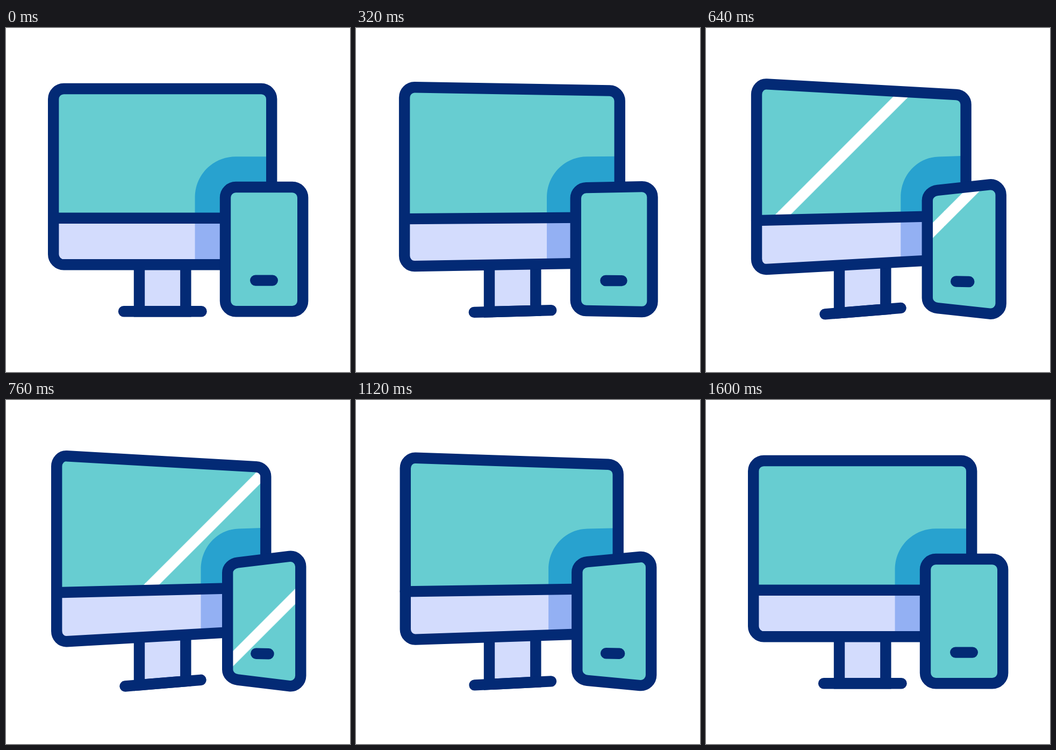
An HTML page for the animation above (1.76 s loop, 640 by 640 pixels).

```html
<!DOCTYPE html>
<html lang="en">
<head>
<meta charset="utf-8">
<title>Monitor and phone</title>
<style>
  html, body { margin: 0; width: 100%; height: 100%; overflow: hidden; background: #fff; }
  svg { display: block; width: 100%; height: 100%; }

  /* Each shape has a front pose (--a) and a turned pose (--b). */
  .monitor path, .phone path, clipPath path {
    d: var(--a);
    animation: turn-monitor 1760ms cubic-bezier(.333, 0, .667, 1) infinite;
  }
  .phone path, clipPath .case { animation-name: turn-phone; }

  @keyframes turn-monitor {
    0%, 5.4%, 82.95%, 100% { d: var(--a); }
    39.5%, 48.9% { d: var(--b); }
  }
  @keyframes turn-phone {
    0%, 9.1%, 87.5%, 100% { d: var(--a); }
    43.2%, 53.4% { d: var(--b); }
  }

  .line { stroke: #032a75; stroke-width: 20.4; stroke-linecap: round; fill: none; }
  .teal { fill: #67cdd1; }
  .pale { fill: #d3dcfd; }

  .glint { stroke: #fff; stroke-width: 20; animation: sweep-monitor 1760ms linear infinite; }
  .phone .glint { animation-name: sweep-phone; }
  @keyframes sweep-monitor {
    0%, 20.45% { transform: translateX(200px); }
    54.55%, 100% { transform: translateX(820px); }
  }
  @keyframes sweep-phone {
    0%, 30.7% { transform: translateX(710px); }
    54.55%, 100% { transform: translateX(1078px); }
  }

  .stand {
    --a: path("M248 440 L248 527.2 L334.3 527.2 L334.3 440");
    --b: path("M248 440 L248 530.3 L334.3 523.2 L334.3 440");
  }
  .base {
    --a: path("M219 527.2 L363.5 527.2");
    --b: path("M221.5 532.5 L362.5 520.8");
  }
  .body {
    --a: path("M88.2 132.3 C88.2 121.7 96.8 113 107.5 113 L475 113 C485.6 113 494.2 121.7 494.2 132.3 L494.2 421 C494.2 431.6 485.6 440.3 475 440.3 L107.5 440.3 C96.8 440.3 88.2 431.6 88.2 421 Z");
    --b: path("M94.2 123.5 C94.2 112.5 102.5 103.6 113 104.2 L465.5 124.2 C475.5 124.8 483.3 132.5 483.3 142.5 L483.3 411 C483.3 421 475.5 428.8 465.5 429.4 L113 449.2 C102.5 449.8 94.2 441 94.2 430 Z");
  }
  .screen {
    --a: path("M88.2 353.7 L88.2 132.3 C88.2 121.7 96.8 113 107.5 113 L475 113 C485.6 113 494.2 121.7 494.2 132.3 L494.2 353.7 Z");
    --b: path("M94.2 358.2 L94.2 123.5 C94.2 112.5 102.5 103.6 113 104.2 L465.5 124.2 C475.5 124.8 483.3 132.5 483.3 142.5 L483.3 348.8 Z");
  }
  .shade {
    --a: path("M351.5 353.7 L351.5 315 C351.5 273 385.5 239.2 427.5 239.2 L494 239.2 L494 353.7 Z");
    --b: path("M362.5 351.8 L362.5 315 C362.5 273.5 393.5 240.8 432 239.6 L483 237.8 L483 348.8 Z");
  }
  .shade-low {
    --a: path("M351.5 353.7 L412 353.7 L412 440 L351.5 440 Z");
    --b: path("M362.5 351.8 L414 350.5 L414 432 L362.5 435 Z");
  }
  .divider {
    --a: path("M88.2 353.7 L420 353.7");
    --b: path("M94.2 358.2 L420 350.3");
  }
  .case {
    --a: path("M408 315.5 C408 304.7 416.7 296 427.5 296 L532.7 296 C543.5 296 552.2 304.7 552.2 315.5 L552.2 507.7 C552.2 518.5 543.5 527.2 532.7 527.2 L427.5 527.2 C416.7 527.2 408 518.5 408 507.7 Z");
    --b: path("M412.2 321.5 C412.2 311.5 420.5 303.8 431 302.5 L527 290.9 C538.3 289.5 548.3 298.5 548.3 310 L548.3 513 C548.3 524.5 538.3 533.5 527 532.1 L431 520.5 C420.5 519.2 412.2 511.5 412.2 501.5 Z");
  }
  .button {
    --a: path("M464.2 469.6 L495.8 469.6");
    --b: path("M465.3 471.7 L488.6 472.3");
  }
</style>
</head>
<body>
<svg viewBox="0 0 640 640">
  <defs>
    <clipPath id="in-screen"><path class="screen"/></clipPath>
    <clipPath id="in-case"><path class="case"/></clipPath>
  </defs>

  <g class="monitor">
    <path class="stand line pale"/>
    <path class="base line"/>
    <path class="body pale"/>
    <path class="screen teal"/>
    <path class="shade" fill="#28a2cf"/>
    <path class="shade-low" fill="#93b0f3"/>
    <g clip-path="url(#in-screen)"><line class="glint" x1="-50" y1="50" x2="-600" y2="600"/></g>
    <path class="divider line"/>
    <path class="body line"/>
  </g>

  <g class="phone">
    <path class="case teal"/>
    <g clip-path="url(#in-case)"><line class="glint" x1="-50" y1="50" x2="-600" y2="600"/></g>
    <path class="case line"/>
    <path class="button line"/>
  </g>
</svg>
</body>
</html>
```
